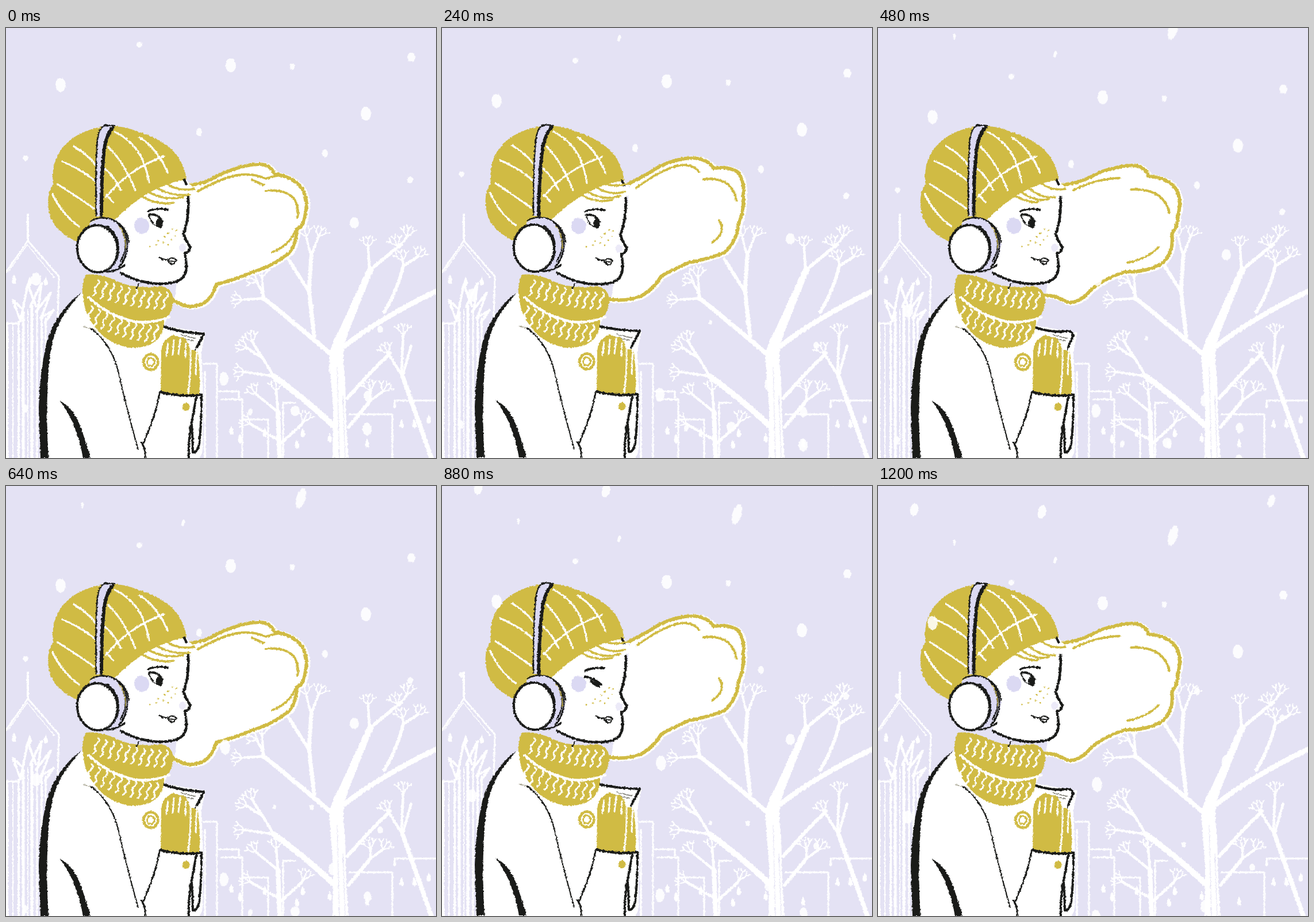
Recreate the animation shown at these times as an HTML page. Size 748x748 px, loop 1280 ms.

```html
<!DOCTYPE html>
<html lang="en">
<head>
<meta charset="utf-8">
<title>Winter walk</title>
<style>
html, body { margin: 0; width: 100%; height: 100%; overflow: hidden; background: #e4e2f4; }
svg { display: block; width: 100vw; height: 100vh; }
path { stroke-linecap: round; stroke-linejoin: round; }
</style>
</head>
<body>
<svg id="stage" viewBox="0 0 748 748"></svg>
<script>
const GOLD = '#d0bb44', INK = '#1a1b19', LILAC = '#dbd9f3', WHITE = '#fff';
const FRAME = 80, FRAMES = 16, FALL = 9.27;

const line = (d, color, w) => `<path d="${d}" fill="none" stroke="${color}" stroke-width="${w}"/>`;
const shape = (d, color) => `<path d="${d}" fill="${color}"/>`;
const oval = (x, y, rx, ry, fill, stroke = 'none', w = 0, turn = 0) =>
  `<ellipse cx="${x}" cy="${y}" rx="${rx}" ry="${ry}" fill="${fill}" stroke="${stroke}" stroke-width="${w}" transform="rotate(${turn} ${x} ${y})"/>`;
const lines = (list, color, w) => list.map(d => line(d, color, w)).join('');

// Little forked buds at the end of a branch; angle in degrees, 0 points up.
function twig(x, y, angle, size = 17, depth = 2) {
  let out = '';
  for (const turn of depth > 1 ? [-42, 0, 40] : [-38, 34]) {
    const a = (angle + turn) * Math.PI / 180;
    const ex = x + Math.sin(a) * size, ey = y - Math.cos(a) * size;
    const b = (angle + turn * 1.5) * Math.PI / 180;
    out += line(`M${x},${y}Q${x + Math.sin(b) * size * .6},${y - Math.cos(b) * size * .6} ${ex},${ey}`, WHITE, 2.4);
    if (depth > 1) out += twig(ex, ey, angle + turn * .7, size * .5, 1);
  }
  return out;
}

function city() {
  const walls = [
    'M0,425L38,370L92,432L90,500', 'M343,584H367V748', 'M370,632H405V643', 'M374,646H411V748',
    'M346,598V748', 'M414,681H456V748', 'M482,748V652H504', 'M597,672H672V748', 'M676,660V648H748',
    'M0,514H22'
  ];
  const stripes = [[1, 514, 6], [12, 516, 2], [22, 510, 4], [30, 495, 5], [38, 490, 2], [45, 484, 5], [54, 490, 3], [62, 500, 4], [69, 505, 3]];
  const drops = [[14, 437], [41, 441], [69, 440], [407, 714], [392, 700], [450, 703], [516, 704], [506, 724], [563, 712], [628, 722], [688, 688], [710, 688], [735, 680]];
  return lines(walls, WHITE, 3) + line('M38,324V370', WHITE, 4) + line('M4,424L37,377L84,434', WHITE, 1.5) +
    stripes.map(([x, y, w]) => line(`M${x},${y}V748`, WHITE, w)).join('') +
    lines(['M25,510L38,446L52,484', 'M28,488L12,473L24,506', 'M42,485L62,443L56,486', 'M52,494L78,460L63,500', 'M60,504L83,491L68,512'], WHITE, 4) +
    drops.map(([x, y]) => shape(`M${x},${y - 8}Q${x + 8},${y + 7} ${x},${y + 8}Q${x - 7},${y + 6} ${x},${y - 8}`, WHITE)).join('');
}

function trees() {
  const trunk = 'M568,748L569,660L562,572Q566,545 582,520L630,416L640,420Q614,480 590,545Q584,570 590,610L592,690L596,748Z';
  const limbs = [
    ['M566,568Q510,520 448,470', 8], ['M570,692Q520,645 466,606', 10], ['M588,554Q650,505 750,457', 9],
    ['M594,644Q630,602 668,566', 6], ['M634,420L688,376', 6], ['M658,494Q684,450 691,412', 6],
    ['M536,536L527,458L531,398', 7], ['M528,460L491,402', 6], ['M596,694L634,648', 6],
    ['M740,748L690,606', 8], ['M476,748L473,668', 8], ['M476,724L512,692', 5]
  ];
  const arms = [
    'M632,420L630,382', 'M688,376L698,362', 'M691,414L716,398', 'M691,414L690,404', 'M531,398L522,362', 'M531,396L544,362',
    'M450,470L410,473', 'M450,470L436,440', 'M448,470L445,432', 'M468,606L414,598', 'M466,606L428,545', 'M448,575L418,556',
    'M634,648L634,630', 'M634,648L656,632', 'M690,606L664,565', 'M688,600L691,532', 'M690,604L705,552',
    'M473,668L434,636', 'M473,668L470,630', 'M472,716L424,688', 'M512,692L518,684'
  ];
  const buds = [
    [630, 380, 0], [698, 362, 10], [680, 378, -20], [716, 398, 30], [690, 404, -15], [522, 362, -12], [544, 362, 25],
    [410, 473, -85], [436, 440, -65], [445, 432, 5], [414, 598, -90], [428, 545, -15], [418, 556, -65],
    [634, 630, -15], [656, 632, 30], [664, 565, -25], [691, 532, 0],
    [434, 636, -35], [470, 630, 0], [424, 688, -60], [518, 684, 20]
  ];
  return shape(trunk, WHITE) + limbs.map(([d, w]) => line(d, WHITE, w)).join('') + lines(arms, WHITE, 4.5) +
    buds.map(([x, y, a]) => twig(x, y, a, 13)).join('') +
    lines(['M576,590L580,748', 'M586,640L590,748'], '#e4e2f4', 1);
}

const poses = [
  {
    tilt: 0, lift: 0,
    hair: 'M316,273Q345,272 370,256Q410,238 438,237Q460,236 467,254Q500,259 514,278Q527,300 521,320Q519,345 506,350Q505,375 494,390Q465,414 425,426Q398,438 366,446Q360,466 347,477Q318,493 291,473',
    curls: ['M334,284Q372,262 402,256Q428,252 452,262L470,257', 'M428,264L448,273', 'M452,283Q490,280 503,300Q510,315 507,330', 'M504,350Q496,376 464,390'],
    fringe: ['M233,291Q262,309 291,304', 'M246,284Q276,302 308,294', 'M260,277Q288,294 320,290', 'M278,270Q298,285 327,280'],
    collar: 'M273,519Q305,530 344,532L330,560'
  },
  {
    tilt: 1, lift: -1,
    hair: 'M326,270Q352,258 378,241Q405,228 432,226Q460,226 473,244Q500,240 515,251Q527,268 524,290Q526,320 516,340Q513,372 491,391Q462,402 430,408Q402,420 381,432Q367,456 345,467Q320,476 292,472',
    curls: ['M338,278Q388,241 420,238Q440,240 447,250', 'M455,263Q505,258 512,300', 'M482,335Q496,356 470,373'],
    fringe: ['M240,289Q268,306 296,299', 'M252,284Q280,302 310,292', 'M268,277Q292,292 318,285', 'M285,272Q305,277 326,270'],
    collar: 'M274,520Q305,527 344,528L329,557'
  },
  {
    tilt: 1.4, lift: -3,
    hair: 'M326,282Q334,243 365,226Q400,210 430,218Q454,225 464,241Q500,236 515,256Q530,280 522,310Q518,325 512,340Q521,376 490,408Q470,420 420,414Q405,430 386,440Q360,463 325,458Q305,460 290,470',
    curls: ['M331,287Q350,252 386,246Q410,241 432,248', 'M467,265Q504,258 512,295Q515,315 508,332', 'M510,345Q510,382 465,395'],
    fringe: ['M236,289Q270,285 292,303', 'M250,283Q285,278 305,302', 'M266,275Q300,274 314,295', 'M285,269Q313,270 322,291'],
    collar: 'M273,522Q308,516 341,533L333,556L302,538'
  },
  {
    tilt: .2, lift: 0,
    hair: 'M315,273Q350,272 385,251Q430,236 453,240Q470,248 470,258Q505,260 519,281Q529,300 522,325Q520,350 511,357Q516,395 490,412Q465,425 430,424Q395,435 371,455Q350,480 330,477Q310,465 290,465',
    curls: ['M340,282Q380,262 420,261', 'M440,281Q497,278 507,322', 'M488,381Q470,401 435,408'],
    fringe: ['M236,290Q258,304 278,303', 'M248,284Q270,303 296,298', 'M262,278Q285,298 308,294', 'M284,270Q302,284 325,280'],
    collar: 'M274,521Q305,531 328,527Q340,528 339,536L330,558'
  }
];

function scarf() {
  let knit = '';
  for (let i = 0; i < 10; i++) {
    const t = i / 9, bend = Math.sin(t * Math.PI / 2);
    const stitch = (x, y) => line(`M${x},${y}c5,5 0,8 -2,10s-6,5 -3,9s-1,7 -4,9`, WHITE, 3);
    knit += stitch(160 + t * 120, 438 + bend * 22) + stitch(149 + t * 114, 484 + bend * 33);
  }
  return shape('M139,429Q129,452 135,474Q138,500 155,520Q172,546 212,556Q252,559 268,536Q276,520 275,508Q289,497 291,474Q290,452 268,449Q225,455 192,440Q165,426 139,429Z', GOLD) +
    knit + line('M144,469Q180,502 225,511Q255,514 284,503', WHITE, 4.5);
}

function coat(p) {
  return `<g transform="translate(0 ${p.lift})">` +
    shape('M130,462Q85,495 70,550Q58,610 57,665L60,760H334L342,735L343,640L340,562L347,530L275,518L290,470Z', WHITE) +
    shape('M130,461Q86,494 70,549Q58,605 57,660L60,748H74Q68,655 76,575Q81,532 98,504Q112,482 130,461Z', INK) +
    shape('M93,648Q117,660 129,692Q140,722 147,748H134Q123,686 93,648Z', INK) +
    line('M135,520Q150,522 158,528', '#aaa795', 1.5) +
    line('M148,523Q184,550 196,600Q209,660 230,733', INK, 2.2) +
    lines(['M267,636Q260,675 238,724', 'M235,721Q243,729 242,748'], INK, 3) +
    lines(['M331,642Q326,670 321,695Q317,725 318,748', 'M340,640Q340,690 336,724Q332,740 325,738Q325,715 323,690'], INK, 4) +
    line(p.collar, INK, 4) + lines(['M299,538L326,544', 'M304,534L330,540'], '#77766c', 1.3) +
    shape('M269,634L270,565Q271,545 281,541Q290,529 300,538Q311,536 317,548L320,560L333,560Q338,590 337,638Q298,640 269,634Z', GOLD) +
    lines(['M282,548L279,570', 'M292,543L290,568', 'M303,542L300,567', 'M313,549L312,572', 'M321,557Q322,600 317,635', 'M332,558L330,602'], WHITE, 3) +
    line('M268,633Q300,642 340,638', INK, 4) +
    oval(313, 659, 6.5, 7, GOLD) + oval(252, 581, 12.5, 13.5, 'none', GOLD, 4.5) + oval(252, 581, 6.5, 7, 'none', GOLD, 3) + '</g>';
}

function hat() {
  const ribs = [
    'M118,206Q144,221 157,240', 'M98,232Q130,245 156,267', 'M90,272Q120,291 153,314', 'M81,289Q98,325 127,345',
    'M190,181Q223,198 237,228Q246,250 249,269', 'M232,190Q264,210 281,251', 'M178,207Q205,233 225,282',
    'M172,245Q187,257 200,282', 'M175,290L186,303', 'M174,294Q212,246 275,223'
  ];
  return shape('M314,264Q309,232 289,212Q266,191 232,181Q205,170 178,170Q139,175 114,193Q90,212 83,240Q80,260 82,272Q68,292 76,324Q84,354 122,371L190,333Q216,306 248,287Q284,267 314,264Z', GOLD) +
    lines(ribs, WHITE, 3.3);
}

function phones() {
  return shape('M157,328Q156,240 159,194Q162,171 174,169L188,171Q176,187 172,222L167,328Z', LILAC) +
    line('M157,326Q155,240 159,194Q162,171 174,169L189,170', INK, 2.5) +
    line('M166,326Q166,250 171,210Q175,185 186,173', INK, 6) +
    shape('M145,340Q160,328 180,331Q213,343 214,376Q210,414 184,423Q160,425 150,420Z', LILAC) +
    lines(['M147,336Q163,327 182,332Q210,343 214,373', 'M190,336Q212,353 211,380Q208,404 197,415', 'M201,350Q216,378 199,406'], INK, 2.5) +
    line('M165,424Q190,426 207,412', INK, 3) + line('M196,344Q210,362 208,384', GOLD, 1.2) +
    oval(159, 384, 35, 41, WHITE, INK, 4, -8) + line('M176,345Q201,363 194,398Q188,414 176,421', INK, 3);
}

function eye() {
  return '<g class="open">' + line('M247,319Q260,312 281,316', INK, 3.5) +
    line('M249,325Q262,321 272,336', INK, 4) + line('M249,328Q254,341 263,345', INK, 2) +
    oval(267, 340, 5.5, 8, INK, 'none', 0, -15) + '</g>' +
    '<g class="blink" visibility="hidden">' + line('M247,321Q260,314 280,316', INK, 4) +
    line('M247,331Q262,334 275,344', INK, 4) + shape('M254,336L275,343L272,350Q260,347 254,336Z', INK) + '</g>';
}

function head(p) {
  const freckles = [[289, 350], [294, 361], [282, 357], [276, 363], [288, 368], [265, 370], [274, 373], [282, 377], [262, 377], [250, 380], [296, 352]];
  const profile = 'Q319,330 309,358Q313,371 320,380Q321,388 311,392Q315,407 313,423Q310,436 297,441Q270,449 238,441Q216,436 200,426';
  return `<g transform="rotate(${p.tilt} 220 440)">` +
    shape('M190,330L240,280L312,262L328,282L317,294' + profile + 'Z', WHITE) +
    oval(236, 344, 13, 14, LILAC, 'none', 0, -15) + oval(307, 382, 6, 7, '#eceaf8') +
    line('M317,294' + profile, INK, 4.5) + line('M231,445L227,453', INK, 2.5) +
    freckles.map(([x, y]) => oval(x, y, 1.5, 1.5, GOLD)).join('') +
    line('M267,399Q275,405 283,402Q290,398 296,403Q296,410 288,411L281,405L294,406', INK, 2.2) +
    eye() + hat() + line('M310,264L314,272', INK, 4) + phones() + '</g>' + lines(p.fringe, GOLD, 3.8);
}

const figure = p => `<g class="pose" display="none" filter="url(#rough)">` +
  `<path d="${p.hair}" transform="translate(2 1)" fill="#fff" stroke="#fff" stroke-width="9"/>` +
  line(p.hair, GOLD, 6) + lines(p.curls, GOLD, 4) + coat(p) + scarf() + head(p) + '</g>';

// x, y at the start, half width, half height, tilt
const flakes = [
  [232, 29, 5, 5], [95, 99, 9, 12], [391, 65, 9, 12], [498, 67, 4, 6], [705, 51, 7, 8], [626, 149, 9, 12],
  [336, 181, 5, 7], [555, 218, 5, 7], [34, 226, 5, 5], [703, 264, 5, 6], [606, 339, 8, 10], [52, 437, 9, 11],
  [651, 524, 5, 6], [379, 610, 8, 12], [629, 640, 7, 9], [503, 666, 8, 9], [628, 698, 8, 11], [33, 662, 5, 7],
  [425, 668, 4, 6], [308, -10, 2.5, 5, 15], [133, -41, 2, 5], [513, -53, 8, 18, 18], [63, -98, 7, 11, 12],
  [285, -94, 7, 12, 15], [684, -113, 6, 11, 15], [381, 380, 9, 13], [467, 484, 3, 4], [532, 485, 4, 5], [568, 592, 7, 11]
];

const stage = document.getElementById('stage');
stage.innerHTML = `<defs><filter id="rough" filterUnits="userSpaceOnUse" x="0" y="-150" width="748" height="900" color-interpolation-filters="sRGB">
  <feTurbulence type="fractalNoise" baseFrequency=".3" numOctaves="2" seed="4"/>
  <feDisplacementMap in="SourceGraphic" scale="4" xChannelSelector="R" yChannelSelector="G"/></filter></defs>
  <rect width="748" height="748" fill="#e4e2f4"/>
  <g filter="url(#rough)">${city() + trees()}</g>
  ${poses.map(figure).join('')}
  <g id="snow" opacity=".88" filter="url(#rough)">${flakes.map(([x, y, rx, ry, turn = 0]) => oval(x, y, rx, ry, WHITE, 'none', 0, turn)).join('')}</g>`;

const snow = document.getElementById('snow');
const figures = [...stage.querySelectorAll('.pose')];
const show = (el, on) => el.setAttribute('visibility', on ? 'inherit' : 'hidden');
let shown = -1;

function draw(now) {
  const step = Math.floor(now / FRAME) % FRAMES;
  if (step !== shown) {
    shown = step;
    const pose = (step >> 1) % 4, blink = step === 10 || step === 11;
    figures.forEach((el, i) => el.setAttribute('display', i === pose ? 'inline' : 'none'));
    show(figures[pose].querySelector('.open'), !blink);
    show(figures[pose].querySelector('.blink'), blink);
    snow.setAttribute('transform', `translate(0 ${step * FALL})`);
  }
}

const start = performance.now();
function tick() {
  draw(performance.now() - start);
  requestAnimationFrame(tick);
}
tick();
</script>
</body>
</html>
```
